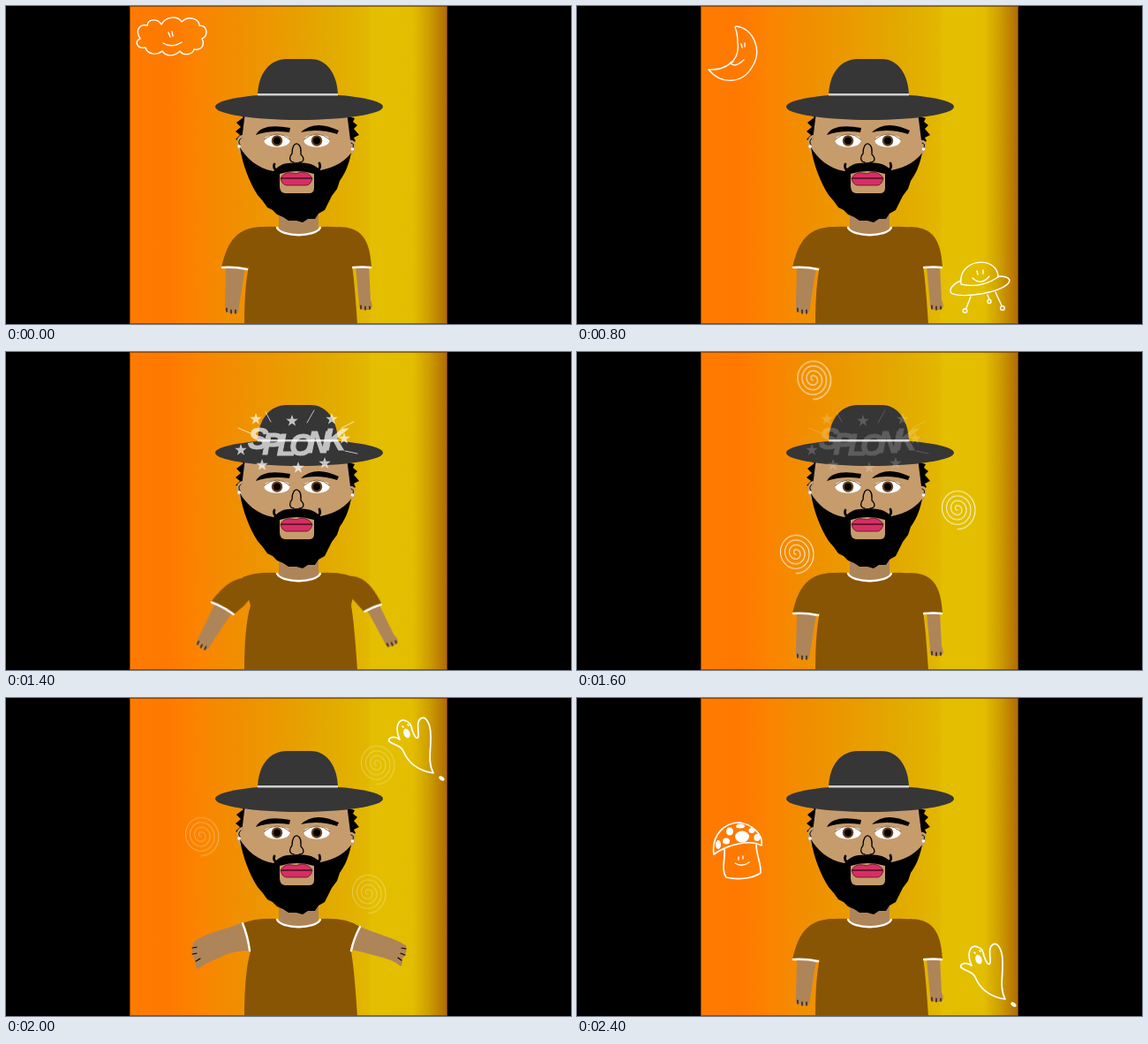
An HTML page without scripts for the animation above (2.8 s loop, 640 by 360 pixels).

```html
<!DOCTYPE html>
<html lang="en">
<head>
<meta charset="utf-8">
<title>Man in a hat</title>
<style>
html, body { margin: 0; width: 100%; height: 100%; overflow: hidden; background: #000; }
svg { display: block; width: 100%; height: 100%; }
.line { fill: none; stroke: #fff; stroke-width: 1.4; stroke-linecap: round; stroke-linejoin: round; }
.line.thin { stroke-width: 1; }
.line.bold { stroke-width: 1.7; }
.ink { fill: none; stroke: #000; stroke-linecap: round; stroke-linejoin: round; }
.fill { fill: #fff; stroke: none; }
.skin { fill: #ae8559; }
.face { fill: #c69c6d; }
.shirt { fill: #885505; }
.trim { fill: none; stroke: #fff; stroke-width: 2.4; stroke-linecap: round; }

/* 14 beats of 200 ms */
.cloud, .ufo, .moon, .bolt, .spark, .splonk, .spirals, .spiral, .ghost, .shroom, .arm, .out {
  animation: 2800ms step-end infinite;
}
.cloud { animation-name: cloud; }
.ufo { animation-name: ufo; }
.moon { animation-name: moon; }
.bolt { animation-name: bolt; }
.spark { animation-name: spark; }
.splonk { animation-name: splonk; }
.spirals { animation-name: fade; }
.spiral { animation-name: orbit; }
.ghost { animation-name: ghost; }
.shroom { animation-name: shroom; }
.out { animation-name: out; }
.arm { animation-name: arm; }
.left { --tilt: 24.5deg; transform-origin: 268px 262px; }
.right { --tilt: -23deg; transform-origin: 394px 262px; }

@keyframes cloud {
  0% { opacity: 1; transform: none; }
  7.14% { transform: translate(-4px, 95px); opacity: 1; }
  14.28% { transform: translate(-.5px, 189px); opacity: .9; }
  21.42% { transform: translate(-4px, 270px); opacity: .9; }
  28.57%, 100% { opacity: 0; }
}
@keyframes ufo {
  0% { opacity: 0; }
  14.28% { opacity: .9; transform: none; }
  21.42% { opacity: 1; transform: translate(5px, 134px); }
  28.57% { opacity: 1; transform: translate(1px, 267px); }
  35.71%, 100% { opacity: 0; }
}
@keyframes moon {
  0% { opacity: 0; }
  28.57% { opacity: 1; transform: none; }
  35.71% { opacity: 1; transform: translate(2px, 131px); }
  42.85% { opacity: 1; transform: translate(-1.5px, 263px); }
  49.99%, 100% { opacity: 0; }
}
@keyframes bolt {
  0% { opacity: 0; }
  35.71% { opacity: 1; transform: translate(64px, -60px); }
  42.85% { opacity: 1; transform: none; }
  49.99%, 100% { opacity: 0; }
}
@keyframes spark {
  0% { opacity: 0; }
  42.85% { opacity: 1; }
  49.99%, 100% { opacity: 0; }
}
@keyframes splonk {
  0% { opacity: 0; }
  49.99% { opacity: .7; }
  57.14% { opacity: .19; }
  64.28%, 100% { opacity: 0; }
}
@keyframes fade {
  0% { opacity: 0; }
  57.14% { opacity: .8; }
  64.28% { opacity: .55; }
  71.42% { opacity: .3; }
  78.57%, 100% { opacity: 0; }
}
@keyframes orbit {
  0% { transform: translate(var(--a)); }
  64.28% { transform: translate(var(--b)); }
  71.42%, 100% { transform: translate(var(--c)); }
}
@keyframes ghost {
  0% { opacity: 0; }
  71.42% { opacity: 1; transform: none; }
  78.57% { opacity: 1; transform: translate(2px, 128px); }
  85.71%, 100% { opacity: 1; transform: translate(1px, 256px); }
}
@keyframes shroom {
  0% { opacity: 0; }
  78.57% { opacity: 1; transform: translate(-5px, -119px); }
  85.71%, 100% { opacity: 1; transform: none; }
}
@keyframes arm {
  0%, 28.57%, 57.14%, 85.71%, 100% { opacity: 1; transform: none; }
  7.14%, 21.42%, 35.71%, 49.99%, 64.28%, 78.57% { opacity: 1; transform: rotate(var(--tilt)); }
  14.28%, 42.85%, 71.42% { opacity: 0; }
}
@keyframes out {
  0%, 21.42%, 49.99%, 78.57%, 100% { opacity: 0; }
  14.28%, 42.85%, 71.42% { opacity: 1; }
}
</style>
</head>
<body>
<svg viewBox="0 0 640 360">
  <defs>
    <linearGradient id="sky">
      <stop offset="0" stop-color="#ff7b00"/>
      <stop offset=".12" stop-color="#ff7900"/>
      <stop offset=".22" stop-color="#fb8400"/>
      <stop offset=".34" stop-color="#f08f00"/>
      <stop offset=".48" stop-color="#ea9b00"/>
      <stop offset=".63" stop-color="#e2aa00"/>
      <stop offset=".75" stop-color="#e2b700"/>
      <stop offset=".76" stop-color="#e4be00"/>
      <stop offset=".89" stop-color="#e3be00"/>
      <stop offset=".94" stop-color="#cf9f00"/>
      <stop offset="1" stop-color="#b06a04"/>
    </linearGradient>
    <path id="coil" transform="scale(1 1.08) rotate(-90)" d="M0 0a2.5 2.5 0 0 1 5 0a5 5 0 0 1-10 0a7.5 7.5 0 0 1 15 0a10 10 0 0 1-20 0a12.5 12.5 0 0 1 25 0a15 15 0 0 1-30 0a17.5 17.5 0 0 1 35 0a20 20 0 0 1-40 0"/>
    <path id="star" d="M0-7L1.7-2.2 6.7-2.2 2.7.9 4.1 5.7 0 2.8-4.1 5.7-2.7.9-6.7-2.2-1.7-2.2Z"/>
    <g id="eye">
      <ellipse rx="14.5" ry="7.3" fill="#fff"/>
      <path fill="none" stroke="#6b4a26" stroke-width=".8" d="M-15-1Q0-14 15-1"/>
      <circle r="6.2" fill="#65401f"/>
      <circle r="4" fill="#000"/>
    </g>
  </defs>

  <rect width="640" height="360"/>
  <rect x="140" width="360" height="360" fill="url(#sky)"/>
  <rect x="140.5" y=".5" width="359" height="359" fill="none" stroke="#5c2c00" stroke-opacity=".6"/>

  <g class="line thin spirals">
    <use class="spiral" href="#coil" style="--a:267.5px,32px;--b:228px,88px;--c:221px,157px"/>
    <use class="spiral" href="#coil" style="--a:431px,179px;--b:430px,128px;--c:420px,76px"/>
    <use class="spiral" href="#coil" style="--a:248px,229px;--b:328px,240px;--c:410px,222px"/>
  </g>

  <!-- arms held out -->
  <g class="out">
    <path class="skin" d="M268 254C250 262 225 266 213 276C210 282 210 290 214 297C214 304 216 308 219 306C225 300 236 297 246 292C257 287 266 286 276 286Z"/>
    <path class="skin" d="M401 259C420 267 438 271 453 280C455 287 452 292 449 295C449 302 448 305 446 303C440 297 428 294 412 290C402 287 396 286 391 285Z"/>
    <path class="ink" stroke-width="1.1" d="M211 283l5-1M211 290l5-1M215 298l5-3M453 284l-5-1M452 291l-5-2M448 297l-4-3"/>
  </g>

  <!-- body -->
  <path class="skin" d="M309 230H354V256Q331 264 309 256Z"/>
  <path class="shirt" d="M268 255Q282 249 307 250C313 262 350 262 356 250Q385 248 401 259C396 270 392 279 391 287C394 305 396 330 398 360H270C270 330 272 303 277 287Z"/>
  <path class="trim" d="M307 251C313 262 350 262 356 251"/>
  <path class="trim out" d="M268 255Q274 270 276 286M401 259Q394 272 391 286"/>

  <!-- arms hanging -->
  <g class="arm left">
    <path class="skin" d="M249 295L248 338Q247 347 252 347L261 348Q264 347 264 340L271 296Z"/>
    <path class="ink" stroke-width="1.1" d="M250 346v-4M255 348v-4M260 348v-4"/>
    <path class="shirt" d="M290 250C263 251 251 264 244 296Q258 298 274 297L280 284Z"/>
    <path class="trim" d="M245 296Q259 295 273 298"/>
  </g>
  <g class="arm right">
    <path class="skin" d="M396 295L400 337Q399 343 405 344L412 344Q417 342 413 333L411 294Z"/>
    <path class="ink" stroke-width="1.1" d="M402 343v-4M407 344v-4M412 343v-3"/>
    <path class="shirt" d="M376 250C402 250 412 263 414 295Q402 297 392 296L388 284Z"/>
    <path class="trim" d="M393 296Q404 295 413 296"/>
  </g>

  <!-- head -->
  <path d="M266 124L269 126 261 132 266 137 260 142 265 146 260 151 270 155 274 124ZM384 124L395 127 393 131 398 135 394 139 400 146 394 149 396 153 388 157Z"/>
  <path class="face" d="M268 146C260 147 259 158 266 168ZM389 152C397 150 398 160 391 170Z"/>
  <path class="face" d="M271 120H386L391 160C386 185 375 200 360 215H296C280 204 268 185 266 160Z"/>
  <path class="ink" stroke-width="1" d="M266 150q-4 3-1 7M391 155q4 1 2 5"/>
  <circle class="fill" cx="264" cy="159" r="1.8"/>
  <circle class="fill" cx="392.5" cy="162" r="1.8"/>
  <path d="M265 160C272 172 285 184 303 187C314 175 322 179 329 177C338 178 346 176 356 186C373 183 386 174 391 166C388 182 383 191 378 198L375 207 369 215 365 223 361 231 354 235 350 241 342 241 336 245 329 243 320 243 314 239 307 236 302 231 296 228 291 221 285 214C276 200 268 180 265 160Z"/>
  <path class="ink" stroke-width="2.8" d="M318 184C310 189 301 186 304 179M342 184C350 189 358 186 355 178"/>
  <path class="face" d="M310 190Q329 184 349 190V206Q349 212 343 212H316Q310 211 310 204Z"/>
  <path fill="#d62f63" stroke="#5d0d28" stroke-width=".8" d="M311 195Q316 187 323 189Q329 191 334 188Q343 188 347 195Q345 203 340 203H318Q313 203 311 195Z"/>
  <path class="ink" stroke-width="1.2" d="M312 195H346"/>
  <path class="ink" stroke-width="1.3" d="M326 177C320 176 321 170 324 167C324 159 327 155 330 156C335 158 334 164 334 168C339 173 337 177 332 177"/>
  <use href="#eye" x="307" y="152.5"/>
  <use href="#eye" x="352" y="152.5"/>
  <path d="M283 146Q290 132 322 138L321 143Q300 140 283 146ZM334 143Q350 128 377 141L375 145Q354 138 334 143Z"/>

  <!-- hat -->
  <g fill="#363636">
    <ellipse cx="332" cy="114" rx="95" ry="15"/>
    <path d="M285 103C285 76 299 60 318 60H345C364 60 376 78 376 103Z"/>
  </g>
  <path d="M285 100.3H376" stroke="#cdd0cf" stroke-width="2.6"/>

  <g class="splonk" fill="#fff">
    <text x="274" y="110" dy="0 6 1 0 -3 -3" letter-spacing="-7" font-family="'Liberation Sans', Arial, sans-serif" font-size="35" font-weight="bold" font-style="italic" stroke="#fff">SPLONK</text>
    <use href="#star" x="283" y="76"/>
    <use href="#star" x="324" y="78"/>
    <use href="#star" x="266" y="111"/>
    <use href="#star" x="383" y="98"/>
    <use href="#star" x="369" y="76"/>
    <use href="#star" x="290" y="128"/>
    <use href="#star" x="331" y="131"/>
    <use href="#star" x="361" y="126"/>
    <path class="line thin" d="M341 80L349 66M300 79L294 68M380 86L394 79M277 92L263 86M384 112L398 115"/>
  </g>

  <g class="line cloud">
    <path d="M158 47C148 49 145 39 152 37C146 28 151 20 160 22C161 14 172 14 176 21C181 11 195 11 199 18C207 10 219 15 219 22C229 22 229 34 222 37C226 45 220 51 213 49C212 55 201 57 197 51C190 58 181 57 177 51C171 56 160 55 158 47Z"/>
    <path d="M178 42Q188 48 199 41M184 30l2 5M188 29l1 5"/>
  </g>

  <g class="line ufo">
    <path d="M434 48C430 18 476 15 476 40M434 48Q456 53 476 40"/>
    <path d="M434 44C424 48 420 54 423 58C434 65 486 57 489 44C489 40 483 39 476 39"/>
    <path d="M447 41Q457 50 466 39M452 33l1 4M459 32v4M445 62L440 75M464 60l2 5M473 57L480 72"/>
    <circle cx="438.5" cy="78" r="2.3"/>
    <circle cx="466" cy="67.5" r="2"/>
    <circle cx="481" cy="75" r="2.3"/>
  </g>

  <g class="line moon">
    <path d="M180 23C200 25 210 50 199 68C188 88 164 90 149 72C168 73 185 62 182 42Q182 31 179 24Z"/>
    <path d="M174 64Q178 71 189 61M174 64l3-1M186 43l1 4M190 42v4"/>
  </g>

  <path class="line bolt" d="M406 61L395 75 401 76 391 87 397 88 384 101 406 86 400 85 412 74 406 73 414 65Z"/>
  <path class="line thin spark" d="M375 94l5 5M380 93l2 6M372 100l6 1M384 103l8 3M388 101l7 1M379 104l-3 3"/>

  <g class="line bold ghost">
    <path d="M453 26C444 22 440 34 446 47C440 42 432 45 434 49C440 54 447 53 450 60C455 72 465 82 484 85C477 72 482 56 481 42C481 30 476 20 470 23C464 27 468 37 467 44C465 48 462 42 460 36C459 30 457 27 453 26Z"/>
    <ellipse class="fill" cx="454" cy="40" rx="3.5" ry="5.5" transform="rotate(-20 454 40)"/>
    <path d="M449 32l1 1M455 30l1 1"/>
    <ellipse class="fill" cx="493.5" cy="91" rx="3.5" ry="2" transform="rotate(35 493.5 91)"/>
  </g>

  <g class="line bold shroom">
    <path d="M155 177C152 154 168 141 184 141C200 143 211 156 209 167C196 160 172 165 155 177Z"/>
    <path d="M167 171C168 184 163 195 169 203C181 206 198 205 208 198C209 188 203 178 203 166"/>
    <path class="line" d="M179 187Q187 192 195 186M183 180v3M188 179v3"/>
    <g class="fill">
      <ellipse cx="187" cy="157" rx="8" ry="6.5"/>
      <ellipse cx="173" cy="151" rx="4" ry="4.5"/>
      <ellipse cx="169" cy="162" rx="4" ry="3.5"/>
      <ellipse cx="185" cy="145" rx="5" ry="2.5"/>
      <ellipse cx="198" cy="150" rx="3.5" ry="3"/>
      <ellipse cx="204" cy="158" rx="3.5" ry="4"/>
      <ellipse cx="160" cy="166" rx="3" ry="5"/>
    </g>
  </g>
</svg>
</body>
</html>
```
